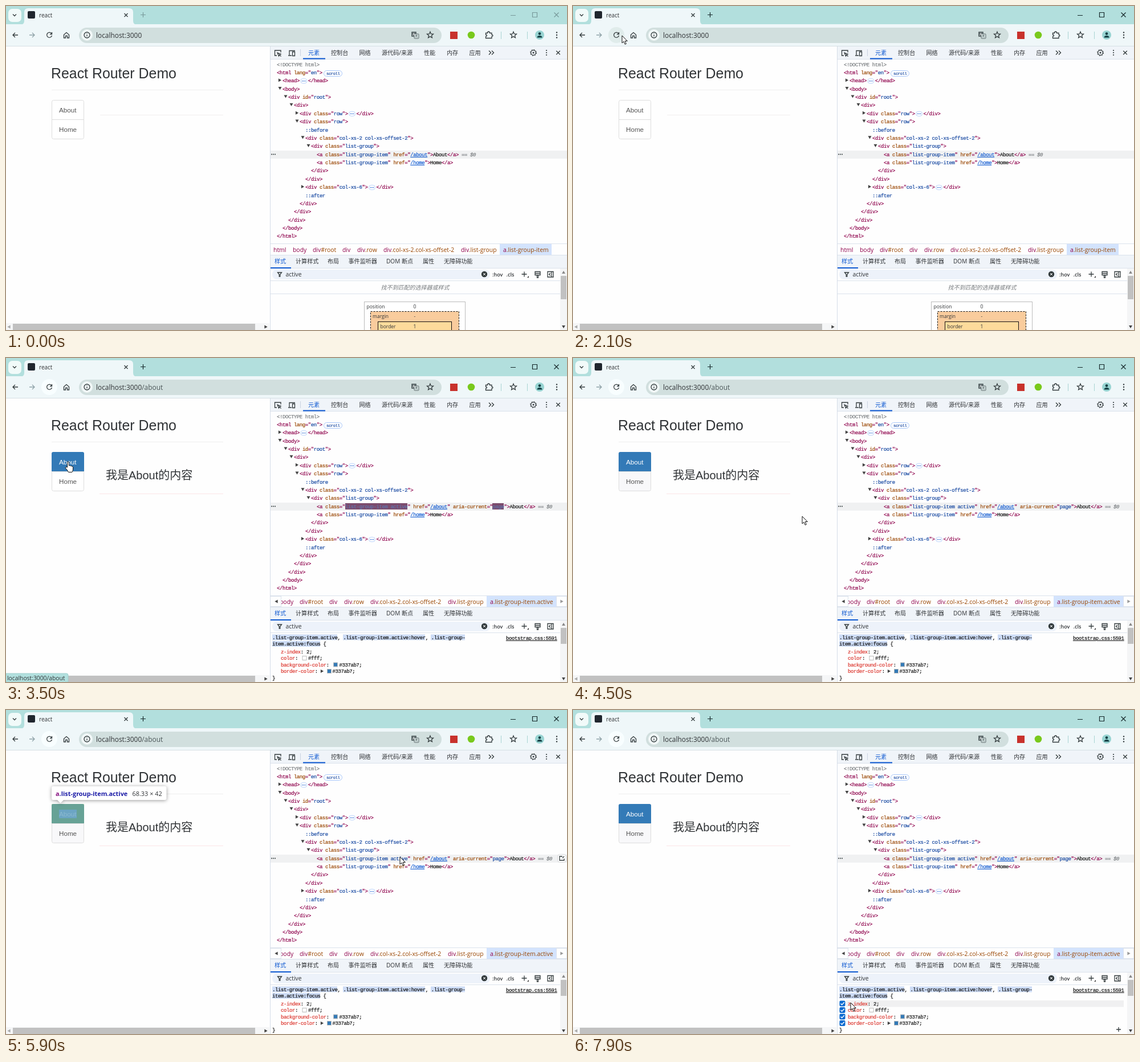
An HTML page for the animation above (8 s loop, 984 px wide and 569 px high).

```html
<!DOCTYPE html>
<html lang="zh">
<head>
<meta charset="utf-8">
<title>React Router Demo</title>
<style>
html, body { margin: 0; width: 100%; height: 100%; overflow: hidden; background: #fefefe; }
svg { display: block; width: 984px; height: 569px; }
text { white-space: pre; font: 10.2px "Open Sans", "Noto Sans CJK SC", "Noto Sans CJK", sans-serif; color: #303336; fill: currentColor; }
text.page { font-family: "Liberation Sans", "Noto Sans CJK SC", "Noto Sans CJK", sans-serif; }
text.code { font: 9px "Liberation Mono", monospace; letter-spacing: -.425px; color: #111; stroke: currentColor; stroke-width: .2; }
.tag { color: #8e004b; } .attr { color: #994500; } .val, text.val { color: var(--val, #1446a0); }
.link { color: #0b57d0; text-decoration: underline; } .prop { color: #dc362e; }
text.gray { color: #777b7e; } text.it { font-style: italic; }
.line { fill: none; stroke: #333b3d; stroke-width: 1.3; }
</style>
</head>
<body>
<svg id="stage" viewBox="0 0 984 569"></svg>
<script>
const CLICK = 3300, LOOP = 8000;

const rect = (x, y, w, h, fill, more = '') => `<rect x="${x}" y="${y}" width="${w}" height="${h}" fill="${fill}" ${more}/>`;
const circle = (x, y, r, fill, more = '') => `<circle cx="${x}" cy="${y}" r="${r}" fill="${fill}" ${more}/>`;
const path = (d, more = 'class="line"') => `<path d="${d}" ${more}/>`;
const text = (x, y, s, size = 10.2, more = '', css = '') => `<text x="${x}" y="${y}" style="font-size:${size}px;${css}" ${more}>${s}</text>`;
const mono = (x, y, s, cls = '') => text(x, Math.round(y), s, 9, `class="code ${cls}"`);
const span = (cls, s) => `<tspan class="${cls}">${s}</tspan>`;
const group = (id, ...parts) => `<g id="${id}">${parts.join('')}</g>`;
const tri = (x, y, dir, fill = '#444') => path('M-3-2.6H3L0 2.6Z', `fill="${fill}" transform="translate(${x} ${y}) rotate(${dir})"`);
const dots = (x, y, dx, dy, r = 1.2) => [-1, 0, 1].map(i => circle(x + i * dx, y + i * dy, r, '#333b3d')).join('');
const cross = (x, y, r, more) => path(`M${x - r} ${y - r}l${2 * r} ${2 * r}m0 ${-2 * r}l${-2 * r} ${2 * r}`, more);
const plus = (x, y, r, more) => path(`M${x - r} ${y}h${2 * r}M${x} ${y - r}v${2 * r}`, more);

// Browser frame: tab strip, toolbar, address bar
function chrome() {
  const bar = '#eff7f9', box = '#d1dfde';
  return rect(0, 0, 984, 33, '#b2dfdd') + rect(4, 5, 23, 23, '#f1faf9', 'rx="7"') + path('M12 14.500l3 3 3-3') +
    path('M25 33q7 0 7-7V11q0-7 7-7H216q7 0 7 7V26q0 7 7 7Z', `fill="${bar}"`) +
    rect(38, 9, 13, 13, '#20262e', 'rx="2"') + text(58, 20, 'react', 10) + cross(210.500, 16, 3) +
    `<g id="controls">${plus(240.5, 15.5, 4.5, '')}${path('M885 16.5h9M923.5 11.5h8v8h-8Z', 'fill="none"')}${cross(965.5, 15.5, 4, '')}</g>` +
    rect(0, 32, 984, 38.5, bar) + rect(0, 70, 984, 1, '#d5dfe4') +
    path('M21 51H12.500M16 47l-4 4 4 4') + path('M41 51H50M46 47l4 4-4 4', 'class="line" style="stroke:#8fa3a8"') +
    circle(76, 51, 14, '#f8feff', 'id="reload"') + path('M80 48.500A4.500 4.500 0 1 0 80.500 52M80.500 46v3.500h-3.500') +
    path('M101.500 50.500l4.500-4 4.500 4V56H107.500V52.500H104.500V56H101.500Z') +
    rect(128, 38, 636, 27, box, 'rx="13.5"') + circle(142, 51, 10, '#f1f8f8') + circle(142, 51, 5, 'none', 'class="line"') +
    path('M142 50.500v3M142 48v1') + text(158, 55.5, 'localhost:3000<tspan id="route" fill="#4c5759">/about</tspan>', 11.9) +
    rect(711, 45, 9, 9, '#5f6b6d', 'rx="1"') + rect(716, 49, 8, 8, box, 'rx="1" stroke="#5f6b6d"') +
    text(713, 52.3, 'A', 7, '', 'color:#fff') + path('M718 51.500h4M720 50.500q0 3-2 4.500M719 52q1 2 3 3', 'fill="none" stroke="#5f6b6d" stroke-width=".8"') +
    star(744, 51, 5.8) + rect(779, 45, 13, 13, '#c8322c') + circle(816, 51, 6.3, '#79c91c') +
    path('M841.500 47.500h3q0-2.500 2-2.500t2 2.500h3.500v3q2 0 2 1.500t-2 1.500v3H841.500v-3q2 0 2-1.500t-2-1.500Z') +
    rect(868, 45, 1, 13, '#a9d4d4') + star(890, 51, 5.8) + rect(914, 45, 1, 13, '#a9d4d4') +
    circle(936, 51, 8, '#98d4d2') + circle(936, 48.6, 2.3, '#123f43') + path('M931.500 55.500q0-3.500 4.500-3.500t4.500 3.500Z', 'fill="#123f43"') + dots(966, 51, 0, 4.5);
}

function star(x, y, r) {
  const p = [...Array(10).keys()].map(i => {
    const a = i * Math.PI / 5, k = i % 2 ? r * .45 : r;
    return (x + k * Math.sin(a)).toFixed(1) + ' ' + (y - k * Math.cos(a)).toFixed(1);
  });
  return path('M' + p.join('L') + 'Z');
}

function page() {
  const label = (y, s, id) => text(93, y, s, 11.67, `class="page" id="${id}"`);
  const frame = (fill, more = '') => rect(80.5, 165.5, 56, 68, fill, 'rx="3" ' + more);
  return text(79, 127, 'React Router Demo', 24.9, 'class="page"') + rect(80, 147, 301, 1, '#eee') +
    frame('#fff') + rect(81, 166, 55, 33, '#fff', 'id="aboutBox"') + rect(81, 199, 55, 34, '#f8f8fa', 'id="homeBox"') +
    frame('none', 'stroke="#ddd"') + rect(80, 199, 57, 1, '#ddd') +
    group('aboutOn', path('M80 199V168q0-3 3-3H134q3 0 3 3V199Z', 'fill="#337ab7"')) +
    label(186.5, 'About', 'about') + label(220.5, 'Home', 'home') +
    group('empty', rect(165, 191, 216, 1, '#f2eeee')) +
    group('content', text(175, 213, '我是About的内容', 20, 'class="page"'), rect(164, 238, 217, 1, '#fbe4e7')) +
    rect(0, 557, 462, 12, '#f5f6f7') + rect(12, 558, 425, 11, '#c1c1c1') + tri(5, 563.5, 90, '#aaa') + tri(456, 563.5, -90) +
    group('bubble', path('M0 554H106q3 0 3 3V569H0Z', 'fill="#b2e0de" stroke="#9fcfcd"'),
      text(2, 566, '', 10.3, 'id="address"'));
}

function tree() {
  const rows = [
    [0, '', '&lt;!DOCTYPE html&gt;'], [0, '', '<html lang="en">'], [1, '>', '<head>   </head>'], [1, 'v', '<body>'],
    [2, 'v', '<div id="root">'], [3, 'v', '<div>'], [4, '>', '<div class="row">   </div>'], [4, 'v', '<div class="row">'],
    [5, '', '::before'], [5, 'v', '<div class="col-xs-2 col-xs-offset-2">'], [6, 'v', '<div class="list-group">'], [7, '', ''],
    [7, '', '<a class="list-group-item" href="/home">Home</a>'], [6, '', '</div>'], [5, '', '</div>'],
    [5, '>', '<div class="col-xs-6">   </div>'], [5, '', '::after'], [4, '', '</div>'], [3, '', '</div>'],
    [2, '', '</div>'], [1, '', '</body>'], [0, '', '</html>']];
  const paint = s => s.replace(/([\w-]+)="([^"]*)"|<\/?\w+|>/g, (m, name, value) => name
    ? span('attr', name) + span('tag', '="') + span(name == 'href' ? 'link' : 'val', value) + span('tag', '"')
    : span('tag', m.replace('<', '&lt;').replace('>', '&gt;')));
  const lines = rows.map(([depth, arrow, s], i) => {
    const x = 475 + depth * 10, y = 102.5 + i * 14.38, gap = s.indexOf('   ');
    let out = /^&/.test(s) ? mono(x, y + 3, s, 'gray') : mono(x, y + 3, paint(s), s[0] == ':' ? 'val' : '');
    if (arrow) out += tri(x - 4.5, y - 1, arrow == 'v' ? 0 : -90);
    if (gap > 0) {
      const cx = x + gap * 4.975 + 7.5;
      out += rect(cx - 5.5, y - 3.5, 11, 8, '#fff', 'rx="4" stroke="#a8c7fa" stroke-width=".8"') +
        [-2.5, 0, 2.5].map(d => circle(cx + d, y + .5, .8, '#0b57d0')).join('');
    }
    return out;
  });
  const link = (id, attrs, cls, end) => group(id, mono(545, 263.7, paint(`<a class="list-group-item${cls}" href="/about"${attrs}>About</a>`)),
    mono(end, 263.7, '== $0', 'gray it'));
  return rect(464, 254, 520, 14, '#f0f1f2', 'id="row"') + dots(469, 260.5, 3, 0, 1) +
    group('flash', rect(595, 255, 109, 11, '#561640'), rect(853, 255, 20, 11, '#561640')) +
    lines.join('') + rect(557.5, 113.5, 32, 10, '#fff', 'rx="5" stroke="#a8c7fa"') + text(562, 121, 'scroll', 7.2, 'class="code val"') +
    link('linkOff', '', '', 799) + link('linkOn', ' aria-current="page"', ' active', 933) +
    group('rowIcon', rect(967.5, 253.5, 15, 14, '#fff', 'rx="4" stroke="#d4d6d8"'), path('M976 257h-5v7h8v-3M976 260l3-3'));
}

function devtools() {
  const bar = '#f0f4f9', edge = '#dbe2ec';
  const tabs = (y, list) => list.map(([x, s], i) => text(x, y, s, 10.1, '', i ? '' : 'color:#0b57d0')).join('');
  const crumbs = (last, from = 0) => [[469, 'html'], [503, 'body'], [538, 'div', '#root'], [590, 'div'], [616, 'div', '.row'],
    [662, 'div', '.col-xs-2.col-xs-offset-2'], [798, 'div', '.list-group'], [872, 'a', last]].slice(from)
    .map(([x, tag, rest = '']) => text(x, 432, span('tag', tag) + span('attr', rest), 10.4)).join('');
  return rect(463, 71, 521, 498, '#fefefe') + rect(463, 71, 521, 22, bar) + rect(463, 93, 521, 1, edge) +
    path('M475 87h-3.500V78H482v3.500M476 82l6 2.500-2.500 1-1 2.500ZM479.500 85.500l3 3') +
    path('M497 86V78.500H507M495 87h6M502.500 80.500h4v7h-4Z') + rect(516, 76, 1, 12, '#c9d3e0') +
    tabs(85.5, [[530, '元素'], [570, '控制台'], [619.5, '网络'], [659, '源代码/来源'], [733, '性能'], [773, '内存'], [812.5, '应用']]) +
    rect(521, 91.5, 39, 2, '#0b57d0') + path('M847 78.500l3.500 3.500-3.500 3.500M852 78.500l3.500 3.500-3.500 3.500') +
    circle(925, 82, 4.3, 'none', 'class="line"') + circle(925, 82, 5.5, 'none', 'stroke="#333b3d" stroke-dasharray="2 2.32"') + circle(925, 82, 1.5, '#333b3d') +
    dots(948, 82, 0, 4, 1.1) + cross(968.5, 82, 3.3) + tree() +
    rect(463, 417, 521, 1, edge) +
    group('crumbsOff', rect(866, 418, 91, 19, '#d3e3fd'), crumbs('.list-group-item')) +
    group('crumbsOn', rect(843, 418, 122, 19, '#d3e3fd'), `<g transform="translate(-23)">${crumbs('.list-group-item.active', 1)}</g>`,
      rect(463, 418, 20, 19, '#fefefe'), rect(463.5, 418.5, 19, 18, 'none', `stroke="${edge}"`), tri(474, 427.5, 90),
      rect(965.5, 418.5, 18, 18, '#fefefe', `stroke="${edge}"`), tri(975, 427.5, -90, '#999')) +
    rect(463, 437, 521, 24, bar) + rect(463, 437, 521, 1, edge) + rect(463, 460, 521, 1, edge) +
    tabs(452, [[471, '样式'], [508, '计算样式'], [564, '布局'], [600.5, '事件监听器'], [667, 'DOM 断点'], [731, '属性'], [768, '无障碍功能']]) +
    rect(463, 459, 37, 2, '#0b57d0') + rect(467, 463, 382, 17, '#edf2fa', 'rx="8"') + path('M476.500 468h7l-2.700 3.500V475h-1.600v-3.500Z') +
    text(490.5, 475, 'active', 10.4) + circle(839, 471, 5.2, '#333b3d') + cross(839, 471, 2, 'stroke="#fff"') +
    text(853, 475, ':hov', 9, '', 'font-weight:600') + text(877.5, 475, '.cls', 9, '', 'font-weight:600') + plus(909, 471, 4.5) + path('M917 474v3h-3Z', 'fill="#333"') +
    path('M928 466.500h9v6h-9ZM928 469.500h9M931.500 473v4h2v-4') + path('M950 466.500h10v9.500H950ZM957 466.500v9.500M955 469l-2.500 2.300 2.500 2.300') +
    rect(463, 482, 509, 1, edge) + group('stylesOff', noStyles()) + group('stylesOn', styles()) +
    rect(972, 461, 12, 108, '#f4f5f6') + tri(978, 467.5, 180, '#888') + rect(973, 474, 10, 41, '#c1c1c1', 'id="thumb"') + tri(978, 563.5, 0) +
    rect(463, 71, 1, 498, '#d5dde8');
}

function noStyles() {
  const small = (x, y, s) => text(x, y, s, 8.5);
  return text(657.5, 498, '找不到匹配的选择器或样式', 10, 'class="gray it"') + rect(463, 505, 509, 1, '#dbe2ec') +
    rect(628.5, 519.5, 177, 60, '#fff', 'stroke="#777" stroke-dasharray="1 1"') + small(632.5, 530.5, 'position') + small(714.5, 530.5, '0') +
    rect(639.5, 536.5, 155, 60, '#f9cc9d', 'stroke="#111" stroke-dasharray="3 2"') + small(643, 547.5, 'margin') + small(715.5, 547.5, '-') +
    rect(652.5, 554.5, 129, 60, '#fddb9b', 'stroke="#111"') + small(656.5, 566, 'border') + small(714.5, 566, '1');
}

function styles() {
  const mark = (x, y, w) => rect(x, y, w, 10, '#cddcf6');
  const swatch = (x, y, c) => rect(x + .5, y - 3.5, 7, 7, c, 'stroke="#bbb"');
  const blue = '#337ab7', ys = [515.5, 527, 538.5, 550];
  const prop = (i, name, x, value) => mono(482, ys[i] + 3, span('prop', name) + ':') + mono(x, ys[i] + 3, value);
  return mark(467, 485.5, 114) + mark(591, 485.5, 144) + mark(745, 485.5, 60) + mark(467, 497, 84) +
    mono(467, 493.5, '.list-group-item.active, .list-group-item.active:hover, .list-group-') + mono(467, 505, 'item.active:focus {') +
    mono(877, 495, '<tspan text-decoration="underline">bootstrap.css:5591</tspan>') +
    group('checks', rect(479, 510, 487, 11.5, '#f0f0f1'), ...ys.map(y => rect(467.5, y - 5, 10, 10, '#0b6bd0', 'rx="2"') +
      path(`M469.500 ${y}l2.200 2.300 4-4.600`, 'fill="none" stroke="#fff" stroke-width="1.4"')), plus(957, 561, 4)) +
    prop(0, 'z-index', 527, '2;') + prop(1, 'color', 530, '#fff;') + prop(2, 'background-color', 584.5, '#337ab7;') + prop(3, 'border-color', 572.5, '#337ab7;') +
    swatch(519.5, ys[1], '#fff') + swatch(574, ys[2], blue) + swatch(563, ys[3], blue) + tri(554.5, ys[3], -90) + mono(467, 564.5, '}');
}

// Inspector highlight over one list item
function inspect(id, y, cls, dimX) {
  return group(id, rect(80, y, 57, 34, 'rgba(147,196,125,.55)'), rect(93, y + 10, 31, 15, 'rgba(111,168,220,.66)'),
    `<g style="filter:drop-shadow(0 1px 3px #0006)">${rect(80, y - 31, dimX - 20, 24, '#fff', 'rx="3"')}${path(`M89 ${y - 8}h13l-6.500 6.500Z`, 'fill="#fff"')}</g>`,
    text(87, y - 14.5, `<tspan fill="#881280">a</tspan><tspan fill="#1a1aa6">.list-group-item${cls}</tspan>`, 10.9, '', 'font-weight:700'),
    text(dimX, y - 14.5, '68.33 × 42', 10.9));
}

const arrow = path('M0 0V13L3 10.300 5.200 15.300 7.300 14.400 5.200 9.500H9.300Z', 'id="arrow" fill="#fff" stroke="#111"');
const hand = path('M3.500 10V1.500q0-1.500 1.400-1.500t1.400 1.500V7q2.200-1 2.700.6 2.100-.8 2.600.8 2-.4 2 1.400V13q0 3-1.700 5.500H5.500Q4 15 .5 11.500q-.8-1.800.8-2Z', 'id="hand" fill="#fff" stroke="#111"');

const $ = id => document.getElementById(id);
$('stage').innerHTML = rect(0, 0, 984, 569, '#fefefe') + chrome() + page() + devtools() +
  inspect('tipAbout', 165, '.active', 221.5) + inspect('tipHome', 199, '', 186) + group('pointer', arrow, hand);

// Pointer route: time, x, y
const route = [[500, 754, 4], [800, 330, 80], [900, 230, 90], [1100, 105, 88], [1200, 88, 78], [1300, 78, 52], [2000, 78, 52],
  [2100, 86, 52], [2200, 86, 52], [2400, 101, 84], [2700, 104, 150], [2900, 104, 182], [3800, 104, 182], [3900, 106, 208], [4000, 128, 277],
  [4100, 146, 334], [4300, 218, 314], [4500, 402, 278], [4600, 498, 268], [4700, 525, 257], [5200, 610, 262], [5600, 666, 260], [5900, 691, 258],
  [6700, 691, 258], [7000, 590, 270], [7200, 452, 284], [7300, 394, 322], [7400, 342, 393], [7600, 331, 422], [7700, 338, 455], [7800, 384, 485], [7900, 487, 514]];

function pointerAt(t) {
  const i = route.findIndex(k => k[0] > t);
  if (i < 0) return route.at(-1).slice(1);
  const [a, b] = [route[Math.max(i - 1, 0)], route[i]], f = i ? (t - a[0]) / (b[0] - a[0]) : 0;
  return [a[1] + (b[1] - a[1]) * f, a[2] + (b[2] - a[2]) * f];
}

function draw(now) {
  const t = Math.floor(now % LOOP / 100) * 100;
  const during = (a, b = LOOP) => t >= a && t < b;
  const show = (id, on) => { $(id).style.display = on ? '' : 'none'; };
  const on = t >= CLICK, flashing = during(CLICK, 3800);
  for (const id of ['aboutOn', 'content', 'linkOn', 'crumbsOn', 'stylesOn', 'route']) show(id, on);
  for (const id of ['empty', 'linkOff', 'crumbsOff', 'stylesOff']) show(id, !on);

  $('controls').setAttribute('style', `stroke:${t < 1400 ? '#78999a' : '#16282a'};stroke-width:1.2`);
  show('reload', t >= 1300);
  $('reload').setAttribute('fill', during(1300, 2400) ? '#e0eceb' : '#f8feff');
  $('row').setAttribute('fill', during(1400, 1700) ? '#d3e3fd' : '#f0f1f2');
  $('thumb').setAttribute('height', on ? 28 : 41);
  $('aboutBox').setAttribute('fill', during(3100, CLICK) ? '#f5f5f5' : '#fff');
  $('about').style.color = on ? '#fff' : '#555';
  $('home').style.color = '#555';
  show('homeBox', t >= 3900);
  show('bubble', during(3100, 4100));
  $('address').textContent = 'localhost:3000/' + (t < 3900 ? 'about' : 'home');
  show('flash', flashing);
  $('flash').style.opacity = Math.min(1, (3800 - t) / 400);
  $('linkOn').style.setProperty('--val', flashing ? '#5f74ae' : '#1446a0');
  show('tipHome', during(4600, 4700) || during(7000, 7100));
  show('tipAbout', during(4700, 7000));
  show('rowIcon', during(4700, 7000));
  show('checks', t >= 7900);

  const [x, y] = pointerAt(t), grab = during(2900, 4000);
  show('pointer', t >= 500);
  show('arrow', !grab);
  show('hand', grab);
  $('pointer').setAttribute('transform', `translate(${x} ${y})`);
}

(function loop() {
  draw(performance.now());
  requestAnimationFrame(loop);
})();
</script>
</body>
</html>
```
